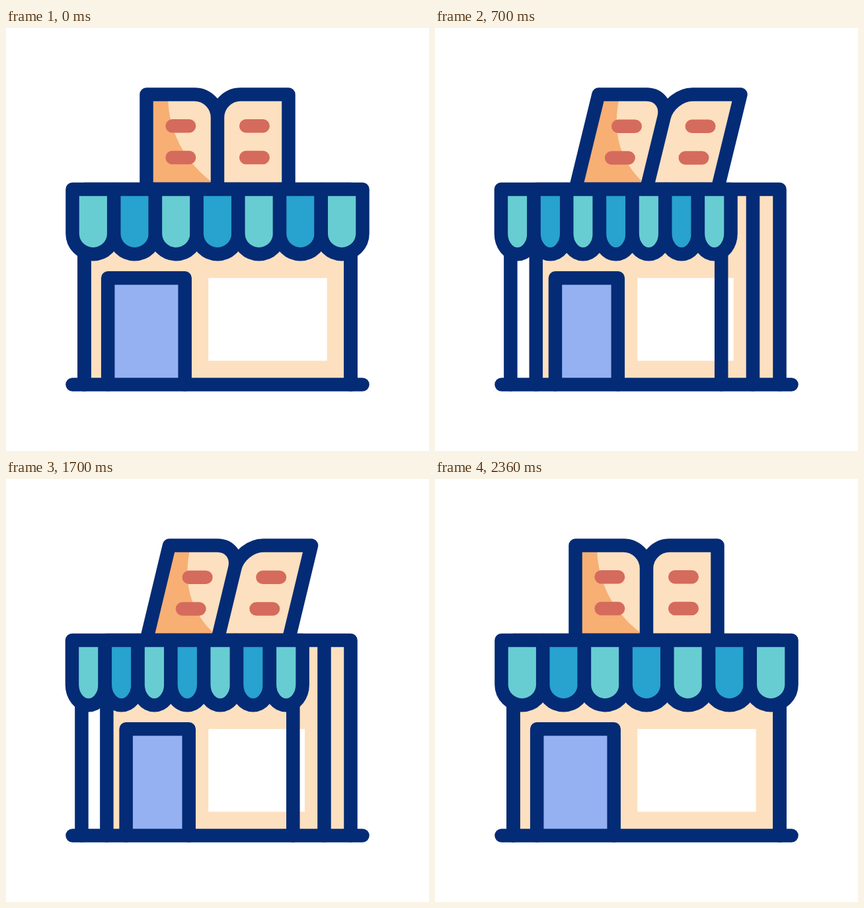
Animation of 640 by 640 pixels, one loop 2.4 s. Source, as an HTML page:

```html
<!DOCTYPE html>
<html lang="en">
<head>
<meta charset="utf-8">
<title>Book shop</title>
<style>
  html, body { margin: 0; width: 100%; height: 100%; overflow: hidden; background: #fff; }
  svg { display: block; width: 100vw; height: 100vh; }
  path { stroke-width: 20.5; stroke-linecap: round; stroke-linejoin: round; }
</style>
</head>
<body>
<svg id="stage" viewBox="0 0 640 640"></svg>
<script>
const LOOP = 2400, START = 10, TURN = 1200, END = 2380;
const NAVY = '#042b75', CREAM = '#fde0bf', ORANGE = '#f7af74', RED = '#d56b5d',
      TEAL = '#67cdd2', BLUE = '#28a2ce', LILAC = '#95b1f2';
const TOP = 243.9, FLOOR = 539.4, STRIPES = 7;

const stage = document.getElementById('stage');
function layer(fill, stroke = 'none') {
  const el = document.createElementNS('http://www.w3.org/2000/svg', 'path');
  el.setAttribute('fill', fill);
  el.setAttribute('stroke', stroke);
  stage.append(el);
  return d => el.setAttribute('d', d);
}

const paper = layer(CREAM);
const shade = layer(ORANGE);
const pages = layer('none', NAVY);
const lines = layer('none', RED);
const wall = layer(CREAM);
const pane = layer('#fff');
const frame = layer('none', NAVY);
const door = layer(LILAC, NAVY);
const poles = layer('none', NAVY);
const stripes = Array.from({ length: STRIPES }, (_, i) => layer(i % 2 ? BLUE : TEAL, NAVY));
layer('none', NAVY)(`M100.5 ${FLOOR}H539.5`);

// cubic-bezier(.85, 0, .15, 1)
function ease(x) {
  let lo = 0, hi = 1;
  for (let i = 0; i < 30; i++) {
    const s = (lo + hi) / 2;
    if (s * (2.55 - s * (4.65 - 3.1 * s)) < x) lo = s; else hi = s;
  }
  return lo * lo * (3 - 2 * lo);
}

function turnAt(t) {
  const u = t < TURN ? (t - START) / (TURN - START) : (END - t) / (END - TURN);
  return ease(Math.min(1, Math.max(0, u)));
}

function drawBook(p) {
  const pt = (x, y) => `${x + p * 43.45 * (TOP - y) / 143.4} ${y} `;
  const page = dir => {
    const q = (dx, y) => pt(320 + dir * dx, y);
    return `M${q(107.5, TOP)}L${q(107.5, 100.5)}L${q(35, 100.5)}` +
           `C${q(15.7, 100.5)}${q(0, 116.2)}${q(0, 135.5)}L${q(0, TOP)}Z`;
  };
  const both = page(-1) + page(1);
  paper(both);
  pages(both);
  shade(`M${pt(212.5, 100.5)}L${pt(245, 100.5)}C${pt(245, 160)}${pt(273, 205)}${pt(315, 235.5)}` +
        `L${pt(315, TOP)}L${pt(212.5, TOP)}Z`);
  const row = (y, shift) => [251.6, 363.2].map(x => `M${x + shift * p} ${y + 0.6 * p}h25.5`).join('');
  lines(row(148.2, 31.8) + row(195.9, 19.3));
}

function drawHouse(p) {
  const left = 118.5 + 42.6 * p, right = 521.5;
  const box = `M${left} ${FLOOR}V${TOP}H${right}V${FLOOR}`;
  const post = (x, y) => `M${x} ${y}V${FLOOR}`;
  wall(box);
  frame(box + post(right - 50.3 * p, TOP));
  pane(`M306.2 378.3H${485.7 - 42.3 * p}V503.6H306.2Z`);
  door(`M${154.2 + 34.5 * p} ${FLOOR}V378.2H${270.7 + 7.6 * p}V${FLOOR}`);
  poles(post(118.5 - 5.1 * p, 320) + post(right - 109.6 * p, 320));
}

function drawAwning(p) {
  const x0 = 100.5 - 0.7 * p, w = (539.5 - 114.2 * p - x0) / STRIPES;
  stripes.forEach((draw, i) => {
    const x = x0 + i * w;
    draw(`M${x} ${TOP}H${x + w}V311A${w / 2} 31.2 0 0 1 ${x} 311Z`);
  });
}

function tick() {
  const p = turnAt(performance.now() % LOOP);
  drawBook(p);
  drawHouse(p);
  drawAwning(p);
  requestAnimationFrame(tick);
}
tick();
</script>
</body>
</html>
```
